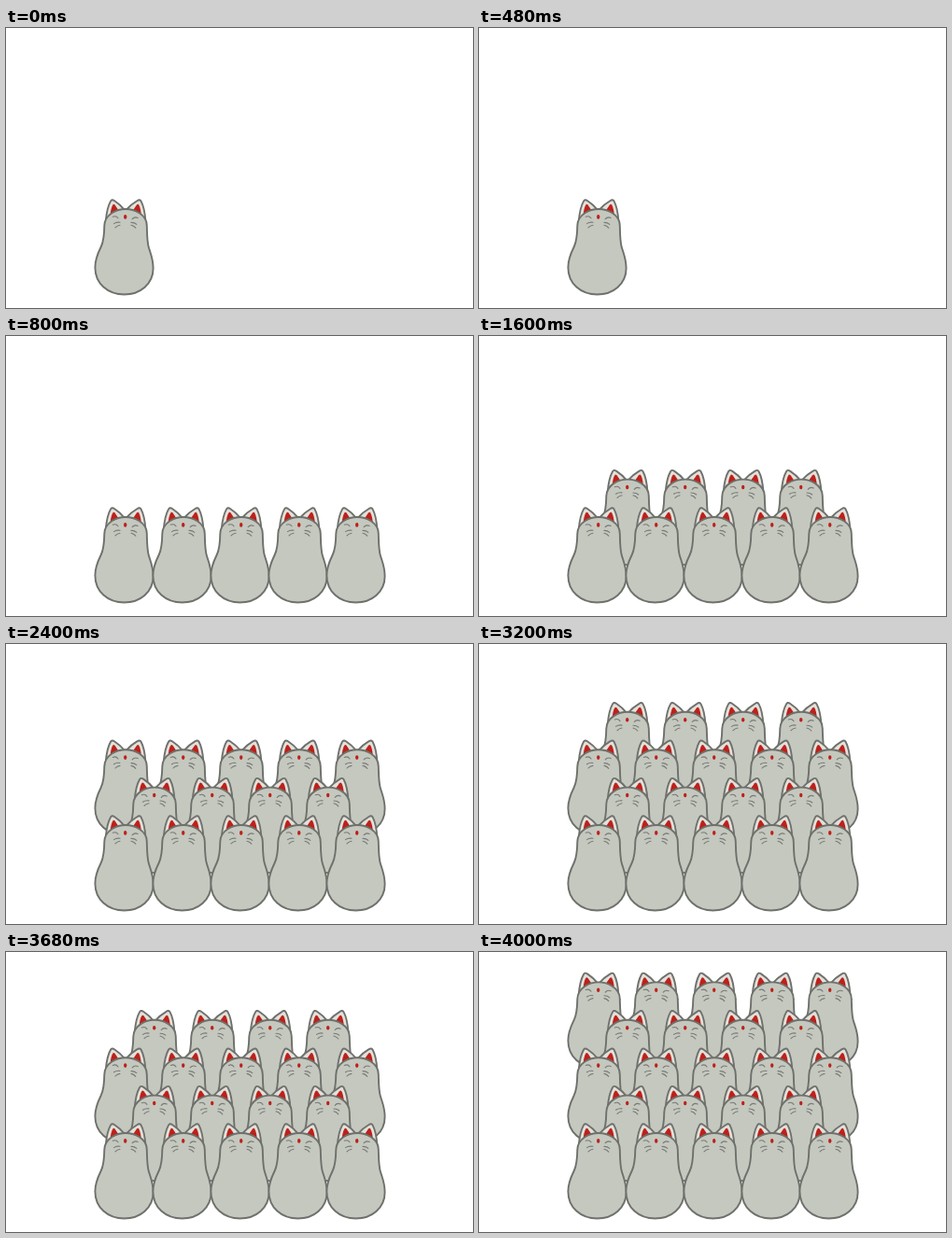
Animation of 500x300 px, one loop 4800 ms. Source, as an HTML page:

```html
<!DOCTYPE html>
<html lang="en">
<head>
<meta charset="utf-8">
<title>Stacking cats</title>
<style>
  html, body { margin: 0; width: 100%; height: 100%; overflow: hidden; background: #fff; }
  svg { display: block; width: 500px; height: 300px; }
</style>
</head>
<body>
<svg id="stage" viewBox="0 0 500 300" fill="none" stroke-linecap="round" stroke-linejoin="round">
  <defs>
    <g id="cat">
      <g fill="#e2e1dc" stroke="#6e706b" stroke-width="1.9">
        <path d="M106.8 207C107.5 198 109.5 190 112 185.6Q113.4 183.2 116 185C120 187.6 124 191 127.5 195.5L128 207Z"/>
        <path d="M149.4 207C148.8 198 147 190 144.6 185.6Q143.2 183.2 140.6 185C136 187.6 132 191 128 195.5L128 207Z"/>
      </g>
      <g fill="#bd211a">
        <path d="M111.6 201C111.8 196 113 191.5 114.4 189.4Q115.4 188.2 116.6 189.6L120.4 195.2Z"/>
        <path d="M144.8 201C144.6 196 143.5 191.5 142.2 189.4Q141.2 188.2 140 189.6L136 195.2Z"/>
      </g>
      <path fill="#c5c8bf" stroke="#6e706b" stroke-width="1.9"
        d="M128 194C137 194 150.8 199.5 150.8 212C151 219 151 229 152.8 235C154.5 241 157.6 247 157.6 257.5C157.6 274 144 285.5 126.5 285.5C109 285.5 95.4 274 95.4 256.5C95.4 247 99 240 101.7 234.5C105 227.5 105.2 221 105.3 212C105.6 199.5 119 194 128 194Z"/>
      <path stroke="#777a74" stroke-width="1.1"
        d="M114.3 202.2Q118 200.7 120 203.8M135.2 204.7Q137.5 201.8 141.2 203.4M115.5 209.6Q118.5 207.6 122 208.3M117 213.8Q119 211.6 122 211.2M134 208.4Q137.5 208.3 139.8 210.4M134 211.2Q137 211.8 138.8 214.2"/>
      <ellipse cx="127.7" cy="202.4" rx="1.7" ry="2.3" fill="#bd211a"/>
    </g>
  </defs>
</svg>
<script>
  const NS = "http://www.w3.org/2000/svg";
  const STEP = 800, STEPS = 6, COL = 62, ROW = 40.4;
  const stage = document.getElementById("stage");

  function addCat(parent, x, y) {
    const cat = document.createElementNS(NS, "use");
    cat.setAttribute("href", "#cat");
    cat.setAttribute("x", x);
    cat.setAttribute("y", y);
    parent.append(cat);
    return cat;
  }

  // Back rows go first; odd rows hold four cats, shifted by half a column.
  const cats = [];
  for (let row = 4; row >= 0; row--) {
    const odd = row % 2;
    for (let col = 0; col < 5 - odd; col++) {
      const el = addCat(stage, (col + odd / 2) * COL, -row * ROW);
      cats.push({ el, from: row + col === 0 ? 0 : row + 1 });
    }
  }

  const start = performance.now();
  function draw(now) {
    const step = Math.floor(Math.max(0, now - start) / STEP) % STEPS;
    for (const { el, from } of cats) el.style.display = step >= from ? "" : "none";
    requestAnimationFrame(draw);
  }
  draw(start);
</script>
</body>
</html>
```
